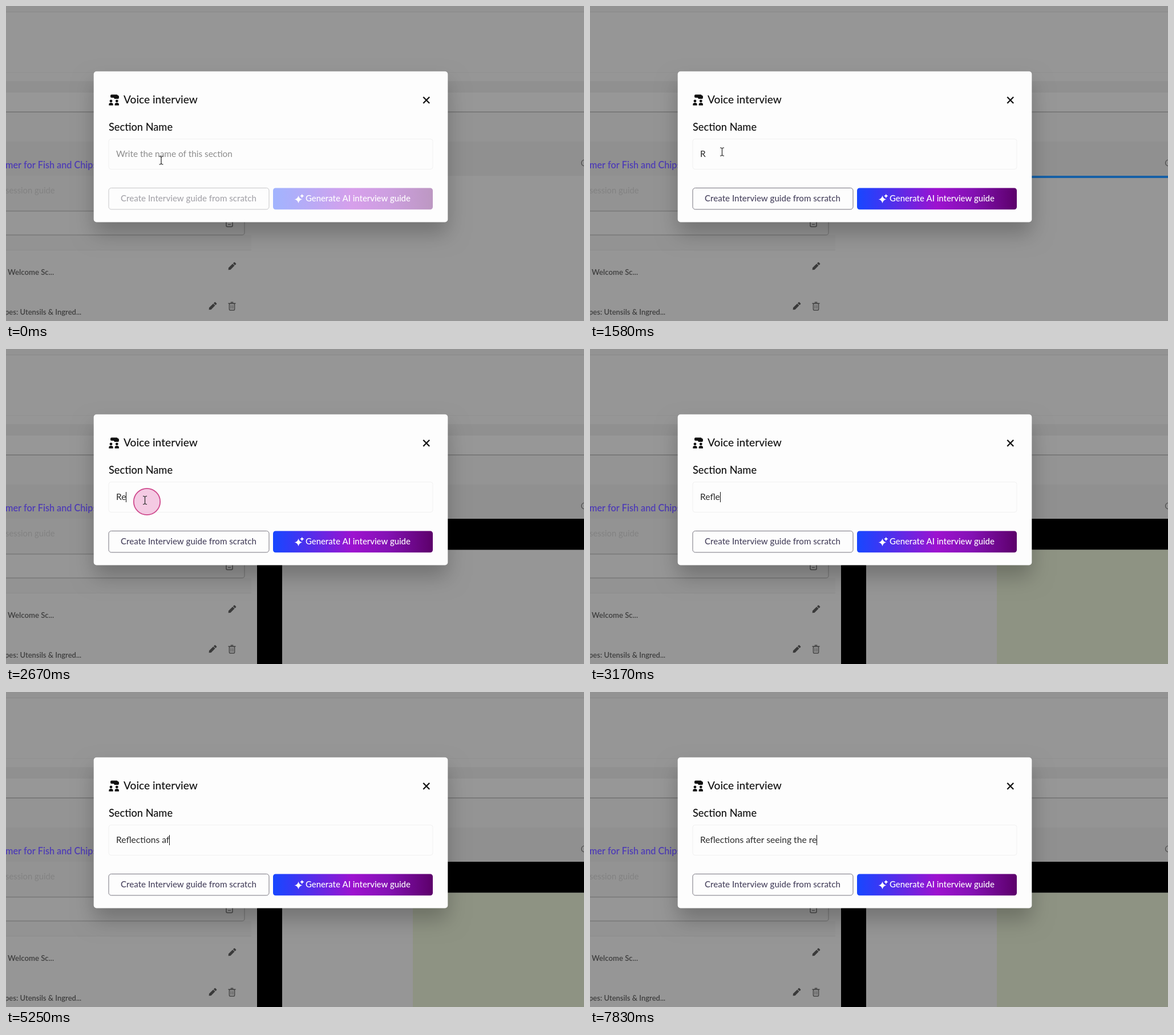
Recreate the animation shown at these times as an HTML page with a canvas. Size 1013 by 553 pixels, loop 8000 ms.

```html
<!DOCTYPE html>
<html lang="en">
<head>
<meta charset="utf-8">
<title>Voice interview</title>
<style>
  html, body { margin: 0; width: 100%; height: 100%; overflow: hidden; background: #969696; }
  canvas { display: block; }
</style>
</head>
<body>
<canvas id="stage" width="1013" height="553"></canvas>
<script>
const ctx = document.getElementById('stage').getContext('2d');
const LOOP = 8000;
const PHRASE = 'Reflections after seeing the re';
const KEYS = [
  1420, 2250, 2830, 3000, 3170, 3330, 3500, 3670, 3830, 4000, 4170,
  4420, 4750, 5000, 5330, 5500, 5670, 5750, 5830, 6000, 6170, 6420,
  6580, 6750, 6920, 7080, 7330, 7420, 7500, 7670, 7830
];
const LINE_AT = 1420, VIDEO_AT = 1830, PICTURE_AT = 3170, POINTER_OFF = 3170;
const CLICK = [2080, 2830];
const LEFT = -10, RIGHT = 1023, BOTTOM = 563; // past the stage, so blurred edges stay outside

const clamp = v => Math.max(0, Math.min(1, v));
const easeOut = p => 1 - (1 - p) ** 3;
const easeInOut = p => p * p * (3 - 2 * p);
const mix = (a, b, p) => a + (b - a) * p;

function rect(x, y, x2, y2, color) {
  ctx.fillStyle = color;
  ctx.fillRect(x, y, x2 - x, y2 - y);
}

function band(y, y2, color) {
  rect(LEFT, y, RIGHT, y2, color);
}

function roundBox(x, y, x2, y2, r) {
  ctx.beginPath();
  ctx.roundRect(x, y, x2 - x, y2 - y, r);
}

function text(str, x, y, size, color, weight = 400) {
  ctx.font = `${weight} ${size}px Lato, "Open Sans", sans-serif`;
  ctx.fillStyle = color;
  ctx.fillText(str, x, y);
}

function line(points, color, width) {
  ctx.strokeStyle = color;
  ctx.lineWidth = width;
  ctx.beginPath();
  points.forEach(([x, y]) => ctx.lineTo(x, y));
  ctx.stroke();
}

function pencil(x, y) {
  ctx.save();
  ctx.translate(x, y);
  ctx.rotate(-Math.PI / 4);
  ctx.fillStyle = '#3a3a3a';
  ctx.beginPath();
  ctx.moveTo(-9, 0);
  ctx.lineTo(-6, -2.4);
  ctx.lineTo(4, -2.4);
  ctx.lineTo(4, 2.4);
  ctx.lineTo(-6, 2.4);
  ctx.fill();
  roundBox(5, -2.4, 8.5, 2.4, 1);
  ctx.fill();
  ctx.restore();
}

function trash(x, y) {
  const color = '#444';
  ctx.strokeStyle = color;
  ctx.lineWidth = 1.5;
  roundBox(x - 4.6, y - 4.5, x + 4.6, y + 7, 1.5);
  ctx.stroke();
  line([[x - 6.5, y - 4.8], [x + 6.5, y - 4.8]], color, 1.6);
  line([[x - 2.3, y - 6.8], [x + 2.3, y - 6.8]], color, 1.5);
  for (const d of [-1.6, 1.6]) line([[x + d, y - 2], [x + d, y + 4.5]], color, 1.1);
}

function star(x, y, r) {
  ctx.beginPath();
  ctx.moveTo(x, y - r);
  for (let i = 1; i <= 4; i++) {
    const a = i * Math.PI / 2, m = a - Math.PI / 4, k = r * 0.24;
    ctx.quadraticCurveTo(x + Math.sin(m) * k, y - Math.cos(m) * k,
                         x + Math.sin(a) * r, y - Math.cos(a) * r);
  }
  ctx.fill();
}

function video(t) {
  if (t >= VIDEO_AT) {
    rect(440, 298, RIGHT, BOTTOM, '#000');
    rect(484, 352.5, RIGHT, BOTTOM, '#969696');
    if (t >= PICTURE_AT) rect(713, 352.5, RIGHT, BOTTOM, '#8e9383');
  } else if (t >= LINE_AT) {
    rect(440, 298, RIGHT, 302, '#1660a6');
  }
}

function page(t) {
  rect(0, 0, 1013, 553, '#969696');
  ctx.save();
  ctx.filter = 'blur(0.7px)';
  band(LEFT, 10, '#939393');
  band(10, 11, '#888');
  band(116, 117, '#919191');
  band(132, 152, '#909090');
  band(152, 186, '#979797');
  band(185, 187, '#7a7a7a');
  band(187, 238, '#949494');
  band(238, 298, '#909090');
  rect(LEFT, 298, 430, 360, '#939393');
  rect(LEFT, 402, 430, 428, '#939393');
  rect(LEFT, 428, 430, 429, '#8d8d8d');

  ctx.strokeStyle = '#7a7a7a';
  ctx.lineWidth = 1.4;
  roundBox(LEFT, 360, 418, 402, 4);
  ctx.stroke();

  text('mer for Fish and Chips', -1, 285, 16.2, '#4e3cb6', 600);
  text('session guide', -1, 329, 14.8, '#828282');
  text('Welcome Sc...', 3, 472, 13.2, '#3e3e3e', 600);
  text('pes: Utensils & Ingred...', -2, 542, 13, '#3e3e3e', 600);
  pencil(396, 457);
  pencil(362, 527);
  trash(396, 527);

  ctx.strokeStyle = '#4a4a4a';
  ctx.lineWidth = 1.5;
  roundBox(386, 376, 397, 387.5, 2);
  ctx.stroke();
  line([[389, 383.5], [394, 383.5]], '#4a4a4a', 1.2);
  ctx.beginPath();
  ctx.arc(1014, 275.5, 5.5, 0, 7);
  ctx.stroke();
  video(t);
  ctx.restore();
}

function peopleIcon() {
  ctx.fillStyle = '#111';
  roundBox(183, 155.5, 196, 161, 2);
  ctx.fill();
  roundBox(189, 157, 198, 163, 2);
  ctx.fill();
  for (const x of [184, 194.3]) {
    ctx.beginPath();
    ctx.arc(x, 166.8, 2.4, 0, 7);
    ctx.fill();
    roundBox(x - 3.7, 170, x + 3.7, 174.5, [3, 3, 0.5, 0.5]);
    ctx.fill();
  }
}

function dialog(active) {
  ctx.save();
  ctx.shadowColor = 'rgba(0,0,0,.24)';
  ctx.shadowBlur = 36;
  ctx.shadowOffsetY = 20;
  ctx.fillStyle = '#fdfdfd';
  roundBox(153.7, 114.7, 774.3, 379.5, 5);
  ctx.fill();
  ctx.restore();

  peopleIcon();
  text('Voice interview', 206, 171, 19.1, '#111', 500);
  text('Section Name', 180, 219, 18.2, '#111', 500);
  line([[731.3, 159.8], [742.2, 170.7]], '#111', 2.3);
  line([[742.2, 159.8], [731.3, 170.7]], '#111', 2.3);

  ctx.lineWidth = 1;
  ctx.strokeStyle = '#f1f1f1';
  roundBox(180, 233.5, 748, 286.5, 4);
  ctx.stroke();

  ctx.strokeStyle = active ? '#77757f' : '#c6c6c8';
  roundBox(180, 319.5, 461, 357, 4.5);
  ctx.stroke();
  text('Create Interview guide from scratch', 201, 343, 15.1,
       active ? '#4a4560' : '#a6a5ab', 500);

  const fill = ctx.createLinearGradient(468, 0, 748, 0);
  [[0, '#1847ff'], [0.1, '#2f3cf8'], [0.5, '#9d12cf'], [0.72, '#8411b4'], [1, '#5c006a']]
    .forEach(([p, c]) => fill.addColorStop(p, c));
  ctx.globalAlpha = active ? 1 : 0.4;
  ctx.fillStyle = fill;
  roundBox(468, 319.5, 748, 357.2, 4.5);
  ctx.fill();
  ctx.globalAlpha = 1;
  ctx.fillStyle = '#fff';
  star(512.5, 339.5, 6.8);
  star(518.8, 333.6, 3.6);
  text('Generate AI interview guide', 525, 343, 14.9, '#fff', 500);
}

function field(t, count) {
  if (!count) {
    text('Write the name of this section', 193, 265.3, 15.35, '#8c8c8c');
    return;
  }
  const typed = PHRASE.slice(0, count);
  text(typed, 193, 265.3, 15.6, '#2c2c2c');
  const idle = t - KEYS[count - 1];
  if (count > 1 && idle % 1000 < 500) {
    const x = Math.round(193 + ctx.measureText(typed).width);
    rect(x, 251, x + 1, 269, '#111');
  }
}

function pointer(t) {
  if (t >= POINTER_OFF) return;
  const a = easeOut(clamp((t - 80) / 750));
  const b = easeInOut(clamp((t - 1650) / 430));
  const x = mix(mix(272, 231.5, a), 243.5, b);
  const y = mix(mix(271, 256, a), 265.5, b);

  if (t >= CLICK[0] && t < CLICK[1]) {
    ctx.globalAlpha = clamp((t - CLICK[0]) / 100) * clamp((CLICK[1] - t) / 100);
    ctx.beginPath();
    ctx.arc(x + 3.5, y + 2.5, 23.2, 0, 7);
    ctx.fillStyle = 'rgba(232,140,195,.45)';
    ctx.fill();
    ctx.strokeStyle = '#cf4b8e';
    ctx.lineWidth = 1.8;
    ctx.stroke();
    ctx.globalAlpha = 1;
  }

  line([[x, y - 6], [x, y + 6]], '#333', 1.3);
  for (const s of [-1, 1]) {
    line([[x - 3.5, y + 7.2 * s], [x - 1.5, y + 7 * s], [x, y + 5.8 * s],
          [x + 1.5, y + 7 * s], [x + 3.5, y + 7.2 * s]], '#333', 1.2);
  }
}

function draw(now) {
  const t = now % LOOP;
  const count = KEYS.filter(k => k <= t).length;
  page(t);
  dialog(count > 0);
  field(t, count);
  pointer(t);
}

let start;
function tick(now) {
  start ??= now;
  draw(Math.max(0, now - start));
  requestAnimationFrame(tick);
}
draw(0);
requestAnimationFrame(tick);
</script>
</body>
</html>
```
